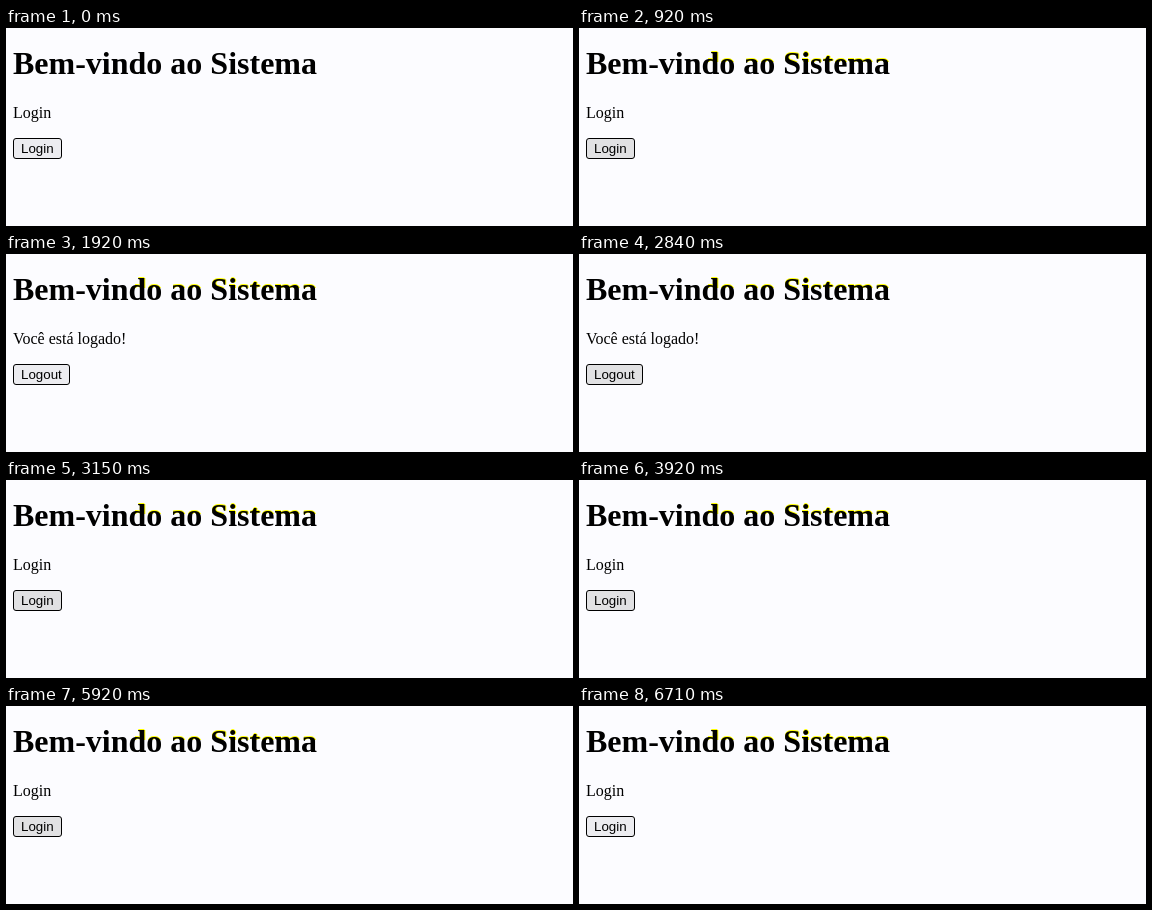
An HTML page for the animation above (7280 ms loop, 567 by 198 pixels).

```html
<!DOCTYPE html>
<html lang="pt-BR">
<head>
<meta charset="utf-8">
<title>Bem-vindo ao Sistema</title>
<style>
  html, body { margin: 0; width: 100%; height: 100%; overflow: hidden; background: #fcfcff; color: #000; }
  h1, p, #button { position: absolute; left: 7px; margin: 0; white-space: nowrap; }
  h1 { top: 17px; font: bold 32px/36px "Liberation Serif", serif; }
  #tint { text-shadow: 0 -1px #ff0, 1px 0 #ff0; clip-path: inset(5px 0 19px 122px); }
  p { top: 76px; font: 16px/17px "Liberation Serif", serif; }
  #button {
    top: 110px; height: 21px; box-sizing: border-box; padding: 0 7px;
    border: 1px solid; border-radius: 3px;
    font: 13.333px/19px "Liberation Sans", sans-serif;
  }
  .normal { background: #ececf0; border-color: #767676; }
  .hover { background: #e1e1e3; border-color: #4f4f4f; }
  .active { background: #f5f5f7; border-color: #8d8d8d; }
</style>
</head>
<body>
<h1>Bem-vindo ao Sistema</h1>
<h1 id="tint" aria-hidden="true">Bem-vindo ao Sistema</h1>
<p id="message">Login</p>
<div id="button" class="normal"><span id="label">Login</span></div>
<script>
  const LOOP = 7280;
  const TINT_START = 920;
  // [start in ms, logged in, button state]
  const steps = [
    [0, false, "normal"],
    [920, false, "hover"],
    [1230, false, "active"],
    [1330, true, "hover"],
    [1580, true, "normal"],
    [2840, true, "hover"],
    [3040, true, "active"],
    [3150, false, "hover"],
    [4090, false, "active"],
    [4190, true, "hover"],
    [4570, true, "active"],
    [4690, false, "hover"],
    [6420, false, "normal"],
  ];
  const get = id => document.getElementById(id);
  const tint = get("tint"), message = get("message"), button = get("button"), label = get("label");
  const start = performance.now();

  function render() {
    const time = Math.max(0, performance.now() - start) % LOOP;
    const [, loggedIn, state] = steps.findLast(([from]) => from <= time);
    tint.style.visibility = time < TINT_START ? "hidden" : "visible";
    message.textContent = loggedIn ? "Você está logado!" : "Login";
    label.textContent = loggedIn ? "Logout" : "Login";
    button.className = state;
    requestAnimationFrame(render);
  }
  render();
</script>
</body>
</html>
```
